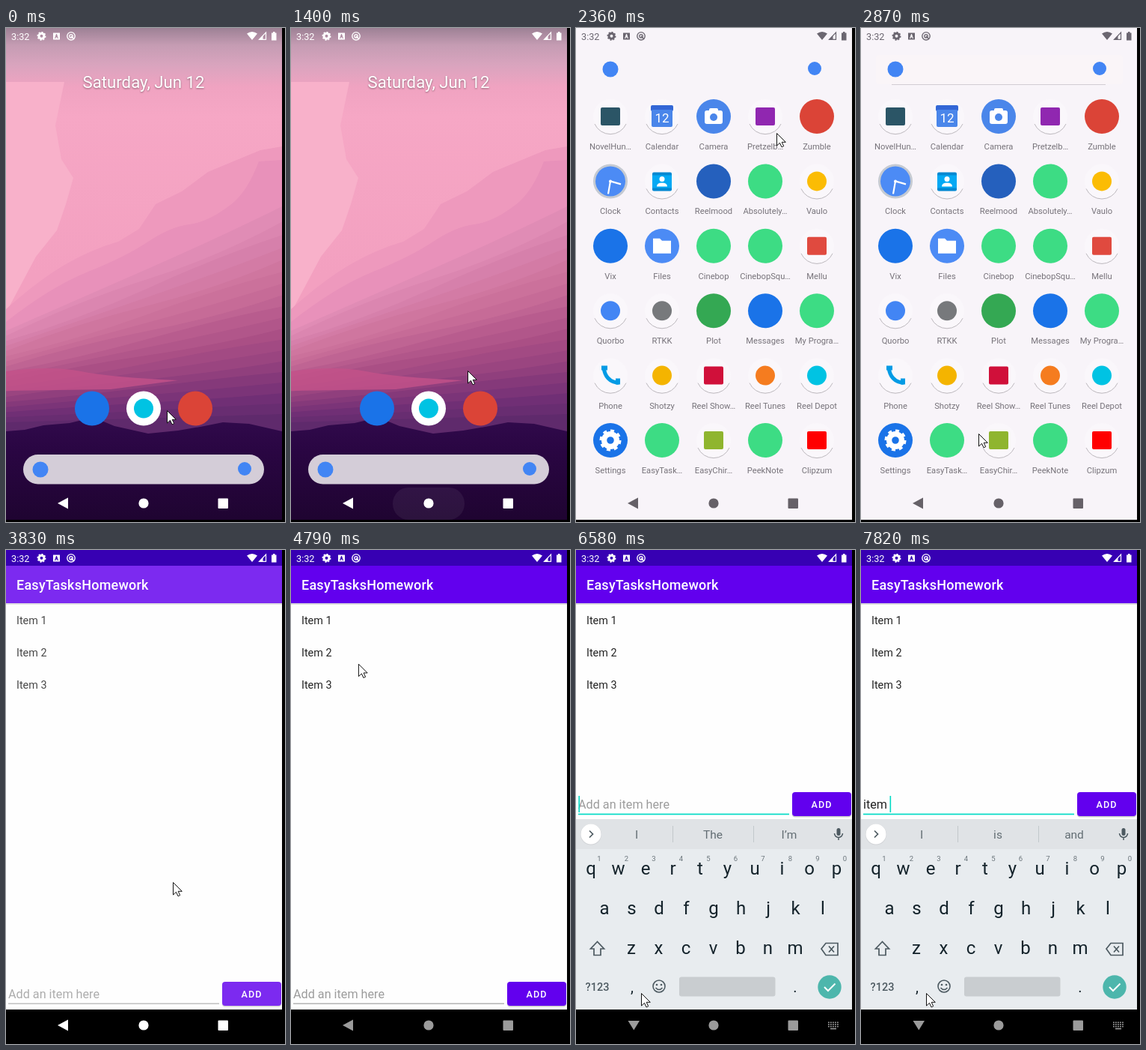
Write an HTML page that moves like this. It is 373 px wide and 659 px high and loops after 8 s.

```html
<!DOCTYPE html>
<html lang="en">
<head>
<meta charset="utf-8">
<style>
  html, body { margin: 0; width: 100%; height: 100%; overflow: hidden; background: #000; }
  svg { display: block; font-family: Roboto, sans-serif; }
  text { white-space: pre; }
  .mid { text-anchor: middle; }
  #date { filter: drop-shadow(0 1px 1px #0006); }
</style>
</head>
<body>
<svg id="stage" width="373" height="659"></svg>
<script>
const LOOP = 8000;
const stage = document.getElementById('stage');

// ---- Drawing helpers ----
const disc = (x, y, r, fill, more = '') => `<circle cx="${x}" cy="${y}" r="${r}" fill="${fill}" ${more}/>`;
const box = (x, y, w, h, fill, r = 0, more = '') =>
  `<rect x="${x}" y="${y}" width="${w}" height="${h}" rx="${r}" fill="${fill}" ${more}/>`;
const shape = (d, fill, more = '') => `<path d="${d}" fill="${fill}" ${more}/>`;
const line = (d, color, width = 1) => shape(d, 'none', `stroke="${color}" stroke-width="${width}"`);
const label = (x, y, size, fill, text, more = '') =>
  `<text x="${x}" y="${y}" font-size="${size}" fill="${fill}" ${more}>${text}</text>`;
const mid = (x, y, size, fill, text, more = '') => label(x, y, size, fill, text, `class="mid" ${more}`);
const group = (id, body, more = '') => `<g id="${id}" ${more}>${body}</g>`;
const gear = (x, y, r, color) =>
  disc(x, y, r * .58, 'none', `stroke="${color}" stroke-width="${r * .5}"`) +
  disc(x, y, r * .86, 'none', `stroke="${color}" stroke-width="${r * .28}" pathLength="16" stroke-dasharray="1"`);
const gradient = (id, stops) => `<linearGradient id="${id}" x2="0" y2="1">${
  stops.map(([at, color]) => `<stop offset="${at}" stop-color="${color}"/>`).join('')}</linearGradient>`;

// ---- Home screen ----
const clouds = [
  ['#f8b1ca', 'M0 72H78L66 130 74 175 90 200 80 235 68 270 40 305 0 380Z'],
  ['#ee99bd', 'M0 375Q45 335 80 315T150 285L178 268 200 235 235 218 270 192 340 163 369 158V560H0Z'],
  ['#e891ba', 'M0 392Q60 345 110 325T190 285Q220 265 245 262T300 236Q322 220 338 178L369 176V560H0Z']
].map(([color, d]) => shape(d, color)).join('');

// Thin layers of dusk, flattening towards the horizon.
const dusk = ['#e08cb5', '#d680ab', '#cf769f', '#c66b97', '#b85c8e', '#aa4f85', '#9a4580', '#85397a', '#702f75', '#5f2a6c'];
const LAYERS = 18;
const layers = Array.from({ length: LAYERS + 1 }, (_, i) => {
  const k = i / LAYERS, left = 404 + 122 * k, right = 238 + 277 * k ** .9;
  const color = dusk[i >> 1], next = dusk[(i + 1) >> 1];
  const wave = 10 * Math.sin(i * 2.1) * (1 - k);
  return shape(`M0 ${left}Q95 ${left * .75 + right * .25 - wave} 190 ${(left + right) / 2}T369 ${right}V560H0Z`,
    `color-mix(in srgb, ${color}, ${next})`);
}).join('') + shape('M0 458Q60 450 100 458T230 470L140 482 0 484Z', '#c5528a', 'opacity=".8"');

const wallpaper = box(0, 0, 369, 656, 'url(#sky)') + clouds + layers +
  shape('M0 538L25 536 50 530 85 527 110 521 128 524 145 531 190 541 230 537 265 531 290 526 325 528 369 538V656H0Z', 'url(#hill)');

const homeUi =
  label(184, 80, 22.2, '#fff', 'Saturday, Jun 12', 'id="date" class="mid"') +
  disc(115, 507.5, 23, '#1a73e8') +
  disc(184, 507.5, 23, '#fff') + disc(184, 507.5, 13, '#00c3e3') +
  disc(253, 507.5, 23, '#db4437') +
  box(23, 569, 322, 39.5, '#d4cdd8', 19.7) +
  disc(46, 589, 10.5, '#4285f4') + disc(319, 588, 9, '#4285f4');

// ---- App list ----
const plain = color => disc(0, 0, 23, color);
const tile = body => plain('#faf7fb') + line('M-21 10A23 23 0 0 0 21 10', '#bdb9be') + body;
const dot = color => tile(disc(0, 0, 13, color));
const square = color => tile(box(-13, -12, 26, 24, color, 2));
const GREEN = '#3ddc84', BLUE = '#1a73e8', SOFT = '#4a86ea';

const calendar = tile(box(-15, -15, 30, 8, '#3367d6', 2) + box(-14, -9, 28, 23, SOFT, 2) + mid(0, 8, 17, '#fff', '12'));
const camera = plain(SOFT) + box(-12, -8, 24, 18, '#fff', 3) + box(-6, -11, 12, 6, '#fff', 2) + disc(0, 1, 5, SOFT);
const clock = plain('#c5cad2') + disc(0, 0, 20, '#4c8bf5') + line('M0 0L-3 17M0 0L14 4', '#fff', 2.2) + disc(0, 0, 2, '#fff');
const contacts = tile(box(-13, -12, 26, 25, '#0288d1', 2) + box(-13, -8, 26, 17, '#03a9f4') +
  disc(0, -3, 3.5, '#fff') + shape('M-7 7Q-7 2 0 2T7 7Z', '#fff'));
const folder = plain('#4c8bf5') + shape('M-12 -10H-3L0 -7H12V10H-12Z', '#fff');
const phone = tile(line('M-9 -11Q-7 8 11 10', '#039be5', 5) + line('M-12 -10H-4M10 12V4', '#039be5', 6));
const settings = plain(BLUE) + gear(0, 0, 14.5, '#fff');

const apps = [
  ['NovelHun…', square('#2b5566')], ['Calendar', calendar], ['Camera', camera], ['Pretzelb…', square('#9027b0')], ['Zumble', plain('#db4437')],
  ['Clock', clock], ['Contacts', contacts], ['Reelmood', plain('#2560bd')], ['Absolutely…', plain(GREEN)], ['Vaulo', dot('#fbbc04')],
  ['Vix', plain(BLUE)], ['Files', folder], ['Cinebop', plain(GREEN)], ['CinebopSqu…', plain(GREEN)], ['Mellu', square('#e04a3f')],
  ['Quorbo', dot('#4285f4')], ['RTKK', dot('#77797c')], ['Plot', plain('#34a853')], ['Messages', plain(BLUE)], ['My Progra…', plain(GREEN)],
  ['Phone', phone], ['Shotzy', dot('#f4b400')], ['Reel Show…', square('#d0103a')], ['Reel Tunes', dot('#f57c1f')], ['Reel Depot', dot('#00c3e3')],
  ['Settings', settings], ['EasyTask…', plain(GREEN)], ['EasyChir…', square('#8fb52f')], ['PeekNote', plain(GREEN)], ['Clipzum', square('#f00')]
].map(([name, icon], i) => {
  const x = 46 + i % 5 * 69, y = 118 + Math.floor(i / 5) * 86.4;
  return `<g transform="translate(${x} ${y})">${icon}${mid(0, 44, 11.2, '#77737a', name)}</g>`;
}).join('');

const drawer =
  box(0, -8, 369, 680, '#f8f4f9', 0, 'id="panel"') +
  group('searchEdge', box(20, 36, 330, 39, '#faf5f8', 4) + line('M41 75.5H327', '#d2cdd3')) +
  disc(46, 55, 10.5, '#4285f4') + disc(319, 54, 9, '#4285f4') + apps;

// ---- To-do app ----
const PURPLE = '#6200ee', TEAL = '#03dac5';
const footer =
  label(3, 598, 16.2, '#9c9c9c', '', 'id="field"') +
  box(3, 604.6, 282, 1, '#8d8d8d', 0, 'id="underline"') +
  box(3.5, 581, 1.6, 22, TEAL, 0, 'id="caret"') +
  box(289, 577.5, 79, 32, '#0003', 4) + box(289, 576, 79, 32, PURPLE, 4) +
  mid(328.5, 597, 12.6, '#fff', 'ADD', 'font-weight="500" letter-spacing="1.1"');
const content =
  box(0, 71, 369, 2, '#0002') + box(0, 21, 369, 50, PURPLE) +
  label(14, 53, 18, '#fff', 'EasyTasksHomework', 'font-weight="500" letter-spacing=".22"') +
  [1, 2, 3].map(n => label(14, 55.5 + 43 * n, 14.4, '#232323', 'Item ' + n)).join('') +
  group('footer', footer);

// ---- Keyboard ----
const INK = '#14232b', SOFT_INK = '#4d5a61';
const keyRow = (letters, x, y) =>
  [...letters].map((key, i) => mid(x + i * 36.5, y, 24, INK, key)).join('');
const keyboard =
  box(0, 359, 369, 254, '#e8ecef') + box(0, 359, 369, 40, '#e0e3e6') +
  disc(20, 379.5, 14, '#0001') + disc(20, 379, 13.5, '#fff') + line('M18 374.5L22.5 379 18 383.5', SOFT_INK, 1.7) +
  [81, 183, 285].map(x => mid(x, 385, 15.5, '#626d73', '', 'data-word')).join('') +
  line('M129.5 368V390M237.5 368V390', '#c2c8cb') +
  box(348.5, 371, 5, 10, SOFT_INK, 2.5) + line('M345.5 378A5.5 5.5 0 0 0 356.5 378M351 383.5V387', SOFT_INK, 1.5) +
  keyRow('qwertyuiop', 20, 433) + keyRow('asdfghjkl', 38, 486) + keyRow('zxcvbnm', 74, 538.5) +
  [...'1234567890'].map((n, i) => mid(31 + i * 36.5, 415, 9.5, '#6b757b', n)).join('') +
  line('M28.5 522.5L19.5 532H24V540.5H33V532H37.5Z', SOFT_INK, 1.7) +
  line('M328 532L334 524.5H350V540.5H334ZM338 528.5L345 536.5M345 528.5L338 536.5', SOFT_INK, 1.7) +
  mid(28.5, 588, 14.5, SOFT_INK, '?123', 'font-weight="500"') +
  mid(75, 590, 20, INK, ',') + mid(293, 590, 20, INK, '.') +
  disc(111, 582, 8, 'none', `stroke="${SOFT_INK}" stroke-width="1.6"`) +
  disc(108, 580, 1.3, SOFT_INK) + disc(114, 580, 1.3, SOFT_INK) + line('M106.5 584Q111 589 115.5 584', SOFT_INK, 1.6) +
  box(138, 569.5, 128.5, 26, '#c9cdd0', 3) +
  disc(339, 583, 15.7, '#4db6ac') + line('M332 583L337 588 346.5 578.5', '#fff', 2);

// ---- System bars ----
const status = label(7, 15.5, 12.7, 'currentColor', '3:32') + gear(47.5, 10.8, 6, 'currentColor') +
  shape('M63 6.5h9v9h-9zM67 8L65 14h1.2l.5-1.4h1.6l.5 1.4H70L68 8z', 'currentColor', 'fill-rule="evenodd"') +
  disc(87, 10.8, 5.2, 'none', 'stroke="currentColor" stroke-width="1.4"') +
  disc(87, 10.8, 2.2, 'none', 'stroke="currentColor" stroke-width="1.3"') + line('M87 10.8L91 15', 'currentColor', 1.4) +
  shape('M322 7.5Q329 2.5 336 7.5L329 16Z', 'currentColor') +
  line('M338.5 15.3H347.5V6Z', 'currentColor', 1.2) + shape('M338 15.5L343.5 10V15.5Z', 'currentColor') +
  shape('M355 6.5H357V5H359.5V6.5H361.5V16.5H355Z', 'currentColor');
const keyDots = Array.from({ length: 15 }, (_, i) =>
  box(337 + i % 5 * 3, 629.5 + Math.floor(i / 5) * 2.7, 1.8, 1.6, 'currentColor')).join('') + box(340, 637.8, 8, 1.6, 'currentColor');
const nav = shape('', 'currentColor', 'id="back"') + disc(184, 634, 6.6, 'currentColor') +
  box(283.5, 627.5, 13.5, 13.5, 'currentColor', 1) + group('keyIcon', keyDots);

stage.innerHTML = `<defs>
  ${gradient('sky', [[0, '#9d8195'], [.035, '#c59cb3'], [.075, '#d9a4be'], [.12, '#f0a3c1'], [.18, '#f6a7c5'], [.5, '#f3a0c0']])}
  ${gradient('hill', [[0, '#310a4c'], [.3, '#2a0643'], [1, '#1f0431']])}
  <clipPath id="screen">${box(0, 0, 369, 656, '#000')}</clipPath></defs>
  <g clip-path="url(#screen)">` +
  wallpaper + group('home', homeUi) + box(136, 613, 96, 43, '#fff', 21, 'id="ripple"') +
  group('drawer', drawer) +
  group('app', box(0, 0, 369, 656, '#fefefe') + box(0, 0, 369, 21, '#3700b3') +
    group('content', content) + group('keys', keyboard) + box(0, 613, 369, 43, '#000')) +
  group('status', status) + group('nav', nav) + '</g>' +
  group('pointer', shape('M.5 .5V17L4.5 13.3 7 18.8 9.7 17.6 7.2 12.3H12.3Z', '#fff', 'stroke="#111"'));

// ---- Timeline ----
// Each span is [first change, last change, number of changes].
const changes = [[0, 0, 1], [280, 1250, 8], [1400, 1700, 3], [1820, 2360, 5], [2480, 2870, 4], [3020, 3020, 1],
  [3290, 3830, 5], [3980, 4220, 3], [4370, 5330, 8], [5480, 6030, 5], [6300, 6580, 3], [6880, 6880, 1], [7430, 7820, 4]]
  .flatMap(([a, b, n]) => Array.from({ length: n }, (_, i) => n > 1 ? a + (b - a) * i / (n - 1) : a));
const pointerPath = [[140, 215, 510], [560, 290, 568], [830, 250, 622], [1100, 188, 634], [1250, 186, 628], [1400, 236, 457],
  [1700, 267, 147], [1820, 270, 122], [2360, 268, 140], [2870, 157, 541], [3020, 119, 556], [3425, 119, 556],
  [3830, 223, 443], [4220, 222, 420], [4900, 62, 95], [5480, 83, 192], [6030, 87, 591]];
const typing = [[7430, 'i', 'I', 'in', 'it'], [7560, 'it', 'it', 'its', 'it’s'],
  [7690, 'item', 'item', 'items', 'items'], [7820, 'item ', 'I', 'is', 'and']];

const mix = (a, b, k) => a + (b - a) * k;
const progress = (t, a, b) => Math.min(1, Math.max(0, (t - a) / (b - a)));
function track(keys, t) {
  const next = keys.findIndex(key => key[0] > t);
  if (next < 1) return keys.at(next).slice(1);
  const a = keys[next - 1], b = keys[next], k = progress(t, a[0], b[0]);
  return a.slice(1).map((value, i) => mix(value, b[i + 1], k));
}

const el = Object.fromEntries([...stage.querySelectorAll('[id]')].map(node => [node.id, node]));
const words = stage.querySelectorAll('[data-word]');
const set = (id, attrs) => { for (const name in attrs) el[id].setAttribute(name, attrs[name]); };
const show = (id, opacity) => {
  el[id].style.opacity = opacity;
  el[id].style.display = opacity > 0 ? '' : 'none';
};
const move = (id, x, y, scale = 1) => set(id, { transform: `translate(${x} ${y}) scale(${scale})` });

function draw(time) {
  const t = changes.findLast(at => at <= time + .01);

  move('pointer', ...track(pointerPath, t));
  show('home', 1 - progress(t, 1400, 1700));
  show('ripple', t < 1100 || t > 1600 ? 0 : t < 1400 ? .1 : .06);

  const [lift] = track([[1400, 656], [1550, 240], [1700, 8], [1820, 0]], t);
  move('drawer', 0, lift);
  show('drawer', t > 1400 ? mix(.7, 1, progress(t, 1400, 1700)) : 0);
  set('panel', { rx: Math.min(14, lift * 2) });
  show('searchEdge', progress(t, 2360, 2600));

  const open = 1 - (1 - progress(t, 3290, 3695)) ** 2;
  move('app', mix(92, 0, open), mix(527, 0, open), mix(.12, 1, open));
  show('app', progress(t, 3290, 3500));
  show('content', progress(t, 3610, 3875));

  const rise = [0, .4, .82, 1][[6300, 6440, 6580].filter(at => t >= at).length];
  const focused = t >= 6300, raised = t >= 6400;
  show('keys', rise && 1);
  move('keys', 0, 254 * (1 - rise));
  move('footer', 0, raised ? -253 : 0);
  set('underline', { fill: focused ? TEAL : '#8d8d8d', height: focused ? 1.7 : 1 });

  const [, typed, ...guesses] = typing.findLast(step => step[0] <= t) || [0, '', 'I', 'The', 'I’m'];
  words.forEach((node, i) => node.textContent = guesses[i]);
  el.field.textContent = typed || 'Add an item here';
  set('field', { fill: typed ? '#232323' : '#9c9c9c' });
  show('caret', focused && !(t >= 6880 && t < 7430) ? 1 : 0);
  set('caret', { x: typed ? 2.5 + el.field.getComputedTextLength() : 3.4 });

  const dark = t >= 1820 && t < 3425;
  const gray = Math.round(mix(255, 155, progress(t, 4220, 4640)));
  el.status.style.color = dark ? '#6b6670' : '#fff';
  el.nav.style.color = dark ? '#666168' : `rgb(${gray},${gray},${gray})`;
  set('back', { d: focused ? 'M69.5 628H85L77.3 640.5Z' : 'M69 634L83 626.5V641.5Z' });
  show('keyIcon', focused ? 1 : 0);
}

function frame(now) {
  draw(now % LOOP);
  requestAnimationFrame(frame);
}
draw(0);
requestAnimationFrame(frame);
</script>
</body>
</html>
```
